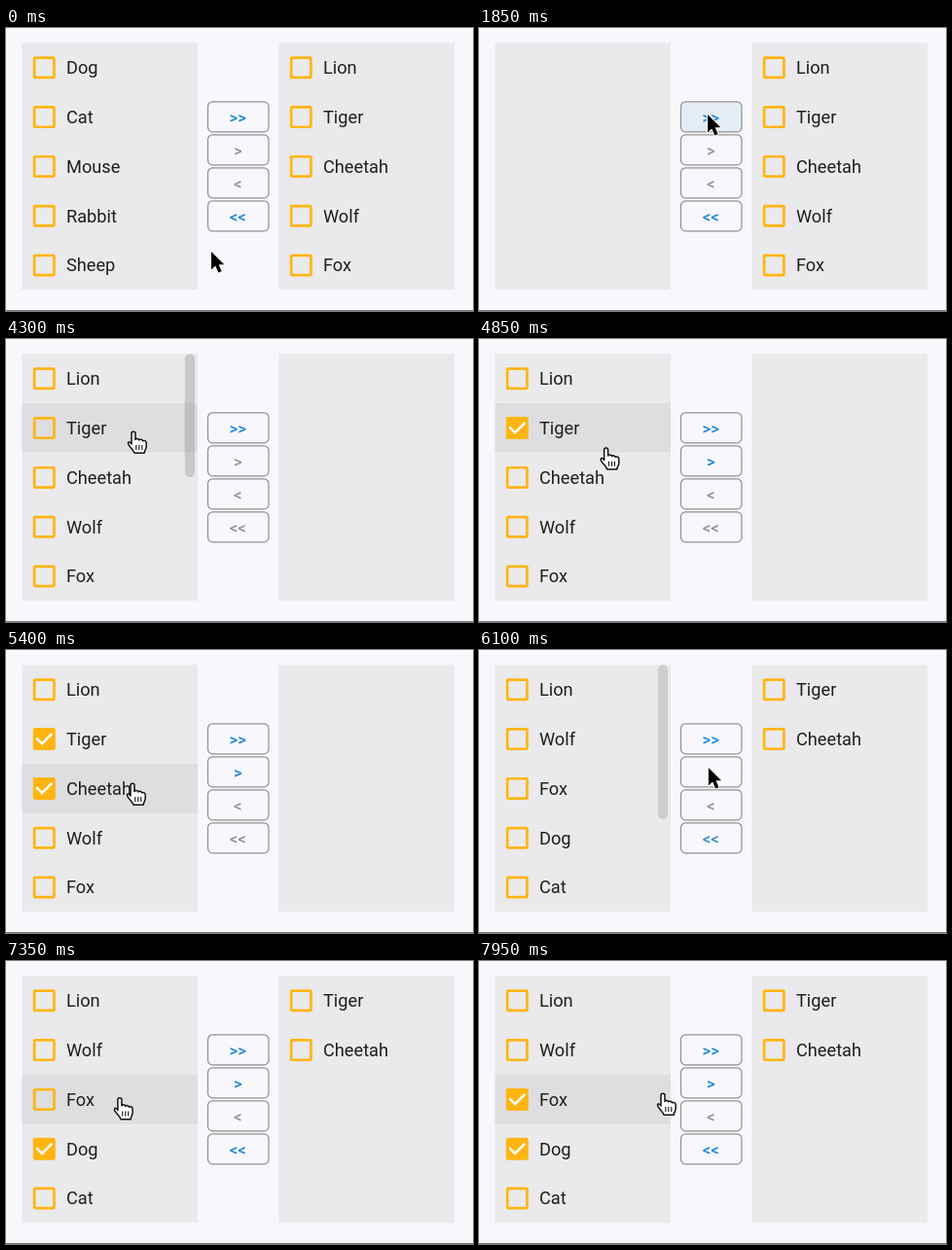
Write an HTML page with a canvas that moves like this. It is 480x291 px and loops after 8000 ms.

```html
<!DOCTYPE html>
<html lang="en">
<head>
<meta charset="utf-8">
<title>Transfer list</title>
<style>
  html, body { margin: 0; width: 100%; height: 100%; overflow: hidden; background: #f8f7fb; }
  canvas { display: block; width: 480px; height: 291px; }
</style>
</head>
<body>
<canvas id="stage"></canvas>
<script>
const W = 480, H = 291, LOOP = 8000;
const canvas = document.getElementById('stage');
const ctx = canvas.getContext('2d');
const ratio = window.devicePixelRatio || 1;
canvas.width = W * ratio;
canvas.height = H * ratio;

const AMBER = '#ffb511', BLUE = [28, 136, 218], GREY = [148, 147, 150];
const PANEL = { top: 15.2, width: 180.6, height: 254, row: 50.8 };
const PANEL_X = { left: 16.4, right: 280.4 };

const pets = ['Dog', 'Cat', 'Mouse', 'Rabbit', 'Sheep'];
const wild = ['Lion', 'Tiger', 'Cheetah', 'Wolf', 'Fox'];
const lists = [
  { at: 0, left: pets, right: wild },
  { at: 1850, left: [], right: [...wild, ...pets] },
  { at: 3400, left: [...wild, ...pets], right: [] },
  { at: 5950, left: ['Lion', 'Wolf', 'Fox', ...pets], right: ['Tiger', 'Cheetah'] }
];

// Each button flips between enabled and disabled at the given times.
const buttons = [
  { label: '>>', y: 75.9, on: true, flips: [1850, 3420] },
  { label: '>', y: 109.9, on: false, flips: [4550, 5950, 6900] },
  { label: '<', y: 143.9, on: false, flips: [] },
  { label: '<<', y: 177.9, on: true, flips: [3420, 5950] }
];
const BUTTON = { x: 207.5, width: 62.5, height: 30.9 };

const checks = {
  Tiger: [4550, 5950],
  Cheetah: [5200, 5950],
  Dog: [6900, LOOP],
  Fox: [7650, LOOP]
};

const pointerPath = [
  [0, 211, 230], [50, 211, 230], [650, 235, 89], [2250, 235, 89],
  [2650, 236, 135], [3000, 244, 188], [3900, 244, 188], [4250, 131, 96],
  [4700, 131, 96], [5050, 130, 138], [5420, 130, 138], [5750, 238, 120],
  [6050, 238, 120], [6700, 115, 175], [7000, 115, 175], [7400, 117, 140],
  [7680, 117, 140], [7950, 189, 137], [LOOP, 189, 137]
];

const arrowShape = new Path2D('M0 0V18.6L4.3 14.6 7.3 21.6 10.6 20.2 7.7 13.3H13.3Z');
const handShape = new Path2D('M-2 12V1.2C-2-1.3 2-1.3 2 1.2V7.4C2.6 5.9 5.5 6.1 5.8 7.9' +
  'C6.6 6.7 9.2 7 9.5 8.8C10.5 8 13.2 8.4 13.2 10.8V14.6C13.2 17.6 11.2 18.6 11.2 21.2' +
  'H1C.6 18.6-2.6 16.6-5 12.6C-6.6 9.8-3.8 8.6-2 12Z');
const handLines = new Path2D('M2.8 13V18M5.8 13V18M8.8 13V18');

const clamp = v => Math.min(1, Math.max(0, v));
const ramp = (t, start, length) => clamp((t - start) / length);
const mix = (a, b, k) => a + (b - a) * k;
const listsAt = t => lists.filter(s => s.at <= t).pop() || lists[0];
const isOn = (b, t) => b.flips.filter(f => f <= t).length % 2 ? !b.on : b.on;

function pointerAt(t) {
  const i = Math.max(1, pointerPath.findIndex(p => p[0] >= t));
  const [t0, x0, y0] = pointerPath[i - 1], [t1, x1, y1] = pointerPath[i];
  const u = ramp(t, t0, t1 - t0), k = u * u * (3 - 2 * u);
  return { x: mix(x0, x1, k), y: mix(y0, y1, k) };
}

// Name of the active element under the pointer, or an empty string.
function targetAt(t) {
  const { x, y } = pointerAt(t);
  const hit = buttons.find(b => isOn(b, t) && x >= BUTTON.x &&
    x <= BUTTON.x + BUTTON.width && y >= b.y && y <= b.y + BUTTON.height);
  if (hit) return hit.label;
  const row = Math.floor((y - PANEL.top) / PANEL.row);
  for (const side of ['left', 'right']) {
    const dx = x - PANEL_X[side];
    if (dx >= 0 && dx <= PANEL.width && row >= 0 && row < 5 && row < listsAt(t)[side].length)
      return side + row;
  }
  return '';
}

// Hover strength fades by averaging over the last moments.
function hoverAt(t) {
  const samples = 8, strength = {};
  for (let k = 0; k < samples; k++) {
    const name = targetAt(Math.max(0, t - k * 18));
    strength[name] = (strength[name] || 0) + 1 / samples;
  }
  return strength;
}

function roundBox(x, y, w, h, r) {
  ctx.beginPath();
  ctx.roundRect(x, y, w, h, r);
}

function drawCheckbox(x, y, amount) {
  ctx.strokeStyle = ctx.fillStyle = AMBER;
  ctx.lineWidth = 2.7;
  roundBox(x + 1.35, y + 1.35, 20.3, 20.3, 0.8);
  ctx.stroke();
  if (!amount) return;
  ctx.globalAlpha = clamp(amount * 2);
  ctx.fill();
  ctx.globalAlpha = 1;
  const tick = clamp(amount * 2 - 1);
  if (!tick) return;
  const first = clamp(tick * 2), second = clamp(tick * 2 - 1);
  ctx.beginPath();
  ctx.moveTo(x + 3.5, y + 10.5);
  ctx.lineTo(x + mix(3.5, 9.2, first), y + mix(10.5, 16.2, first));
  if (second) ctx.lineTo(x + mix(9.2, 19.5, second), y + mix(16.2, 5.9, second));
  ctx.strokeStyle = '#fff';
  ctx.lineWidth = 2.5;
  ctx.stroke();
}

function drawPanel(side, t, hover) {
  const x = PANEL_X[side], state = listsAt(t), items = state[side];
  ctx.fillStyle = '#eae9eb';
  ctx.fillRect(x, PANEL.top, PANEL.width, PANEL.height);
  ctx.font = '18.2px Roboto, sans-serif';
  ctx.textAlign = 'left';
  items.slice(0, 5).forEach((name, i) => {
    const top = PANEL.top + i * PANEL.row;
    ctx.fillStyle = `rgba(0,0,0,${0.05 * (hover[side + i] || 0)})`;
    ctx.fillRect(x, top, PANEL.width, PANEL.row);
    const [from, to] = checks[name] || [LOOP, LOOP];
    const amount = t < to ? ramp(t + 50, from, 200) * (t >= from) : 0;
    drawCheckbox(x + 11.4, top + 14.1, amount);
    ctx.fillStyle = '#1f1e21';
    ctx.fillText(name, x + 45.6, top + 32);
  });
  if (items.length > 5) {
    const age = t - state.at;
    const shown = ramp(age, 20, 150) * (1 - ramp(age, 1150, 250));
    ctx.fillStyle = `rgba(0,0,0,${0.14 * shown})`;
    roundBox(x + 167.4, PANEL.top, 10.2, PANEL.height * 5 / items.length, 5.1);
    ctx.fill();
  }
}

function drawButton(b, t, hover) {
  roundBox(BUTTON.x, b.y, BUTTON.width, BUTTON.height, 4.8);
  ctx.fillStyle = `rgba(226,236,246,${hover[b.label] || 0})`;
  ctx.fill();
  ctx.strokeStyle = '#929194';
  ctx.lineWidth = 1.25;
  ctx.stroke();
  const last = b.flips.filter(f => f <= t).pop();
  const k = last === undefined ? 1 : ramp(t, last, 200);
  const [from, to] = isOn(b, t) ? [GREY, BLUE] : [BLUE, GREY];
  ctx.fillStyle = `rgb(${from.map((c, i) => Math.round(mix(c, to[i], k)))})`;
  ctx.font = '500 16.8px Roboto, sans-serif';
  ctx.textAlign = 'center';
  ctx.fillText(b.label, BUTTON.x + BUTTON.width / 2 - 0.4, b.y + 21.8);
}

function drawPointer(t) {
  const { x, y } = pointerAt(t), hand = targetAt(t) !== '';
  ctx.save();
  ctx.translate(x, y);
  ctx.lineJoin = 'round';
  ctx.lineWidth = hand ? 1.5 : 1.8;
  ctx.fillStyle = hand ? '#fff' : '#000';
  ctx.strokeStyle = hand ? '#111' : '#fff';
  const shape = hand ? handShape : arrowShape;
  if (hand) {
    ctx.fill(shape);
    ctx.stroke(shape);
    ctx.lineWidth = 1.1;
    ctx.stroke(handLines);
  } else {
    ctx.stroke(shape);
    ctx.fill(shape);
  }
  ctx.restore();
}

function draw(t) {
  ctx.setTransform(ratio, 0, 0, ratio, 0, 0);
  ctx.fillStyle = '#f8f7fb';
  ctx.fillRect(0, 0, W, H);
  ctx.fillStyle = '#77767a';
  ctx.fillRect(0, 290, W, 1);
  const hover = hoverAt(t);
  drawPanel('left', t, hover);
  drawPanel('right', t, hover);
  buttons.forEach(b => drawButton(b, t, hover));
  drawPointer(t);
}

const start = performance.now();
function tick() {
  draw((performance.now() - start) % LOOP);
  requestAnimationFrame(tick);
}
tick();
</script>
</body>
</html>
```
